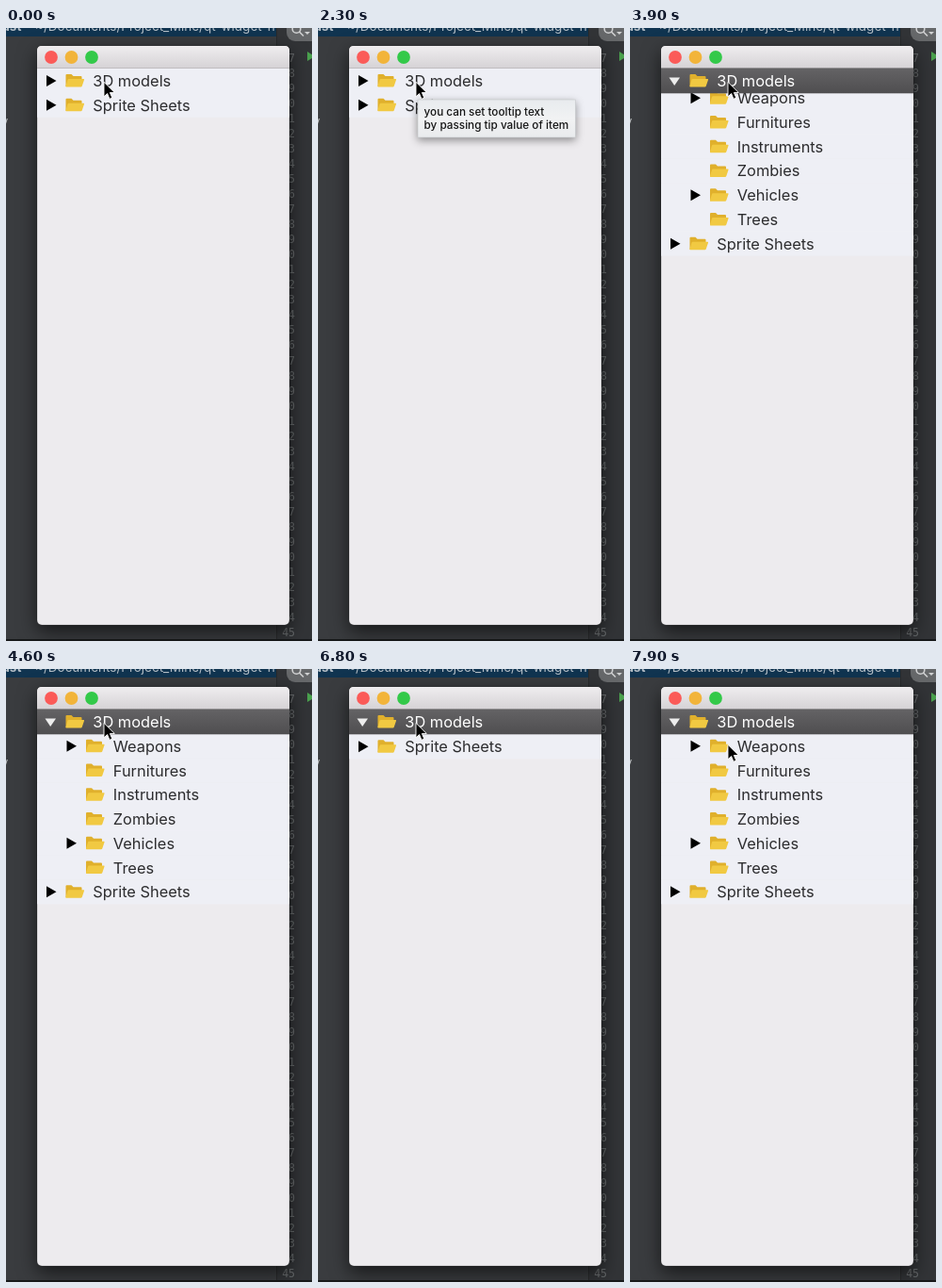
An HTML page that plays this animation: 325x650 px, repeating every 8 s.

```html
<!DOCTYPE html>
<html lang="en">
<head>
<meta charset="utf-8">
<title>Tree widget</title>
<style>
html, body { margin: 0; width: 100%; height: 100%; overflow: hidden; background: #36383a; }
svg { display: block; width: 325px; height: 650px; }
text { white-space: pre; }
.row { font: 16.4px Inter, "Open Sans", sans-serif; fill: #2c2c2e; }
.tip { font: 500 11.75px Inter, "Open Sans", sans-serif; fill: #161616; }
.line { font: 11.5px "DejaVu Sans Mono", monospace; fill: #66696b; text-anchor: end; }
.path { font: 13.5px Inter, "Open Sans", sans-serif; fill: #b4bec6; }
#win { filter: drop-shadow(0 7px 10px #0009); }
#tip { filter: drop-shadow(0 3px 4px #0006); }
</style>
</head>
<body>
<svg viewBox="0 0 325 650">
  <defs>
    <linearGradient id="bar" x2="0" y2="1"><stop stop-color="#efedef"/><stop offset="1" stop-color="#d5d2d5"/></linearGradient>
    <linearGradient id="sel" x2="0" y2="1"><stop stop-color="#646365"/><stop offset="1" stop-color="#4f4e50"/></linearGradient>
    <linearGradient id="pane" x2="0" y2="1"><stop stop-color="#e8ebee"/><stop offset=".5" stop-color="#f1f2f3"/><stop offset="1" stop-color="#e9ebed"/></linearGradient>
    <clipPath id="below"><rect x="33" y="69" width="268" height="560"/></clipPath>
    <g id="folder">
      <path d="M.5 6V-6Q.5-7 1.500-7H6.500L8.500-5H16.500Q17.500-5 17.500-4V4Z" fill="#e0b02c"/>
      <path d="M3.500-2H19.500Q20.300-2 20-1L17.800 5.500Q17.500 6.500 16.500 6.500H1Q.3 6.500.5 5.500L2.500-1.200Q2.800-2 3.500-2Z" fill="#f1c942"/>
    </g>
    <path id="shut" d="M-5-6 5.500 0-5 6Z"/>
  </defs>

  <rect width="325" height="650" fill="#3a3c3f"/>
  <rect x="287" width="38" height="650" fill="#323437"/>
  <path d="M287.500 0V650" stroke="#292b2c"/>
  <rect width="287" height="9" fill="#103450"/>
  <text class="path" y="3"><tspan x="-4" font-weight="700">ast</tspan><tspan x="31">~/Documents/Project_Mine/qt-widget-n</tspan></text>
  <rect x="298" y="-12" width="40" height="26" rx="9" fill="#66686a"/>
  <g fill="none" stroke="#d0d1d2" stroke-width="1.600"><circle cx="308.500" cy="1" r="4.300"/><path d="M311.500 4 316 8.500"/></g>
  <path d="M317 4H323L320 7Z" fill="#d0d1d2"/>
  <text x="-4.500" y="103" font-family="Inter, sans-serif" font-size="12" fill="#b8bbbd">y</text>
  <g id="lines"></g>
  <path d="M320 25 328 30 320 35Z" fill="#4aa14e"/>
  <path d="M0 649H325" stroke="#17191a" stroke-width="2"/>

  <g id="win">
    <rect x="33" y="19" width="268" height="614" rx="5" fill="#edebee" stroke="#0005" stroke-width=".6"/>
    <path d="M33 43V24Q33 19 38 19H296Q301 19 301 24V43Z" fill="url(#bar)"/>
    <path d="M33 42.500H301" stroke="#c0bdc0"/>
    <circle cx="48" cy="31" r="6.900" fill="#fb5b58"/>
    <circle cx="69.500" cy="31" r="6.900" fill="#f2b43a"/>
    <circle cx="91" cy="31" r="6.900" fill="#33c949"/>
  </g>
  <g clip-path="url(#below)"><g id="kids"></g></g>
  <g id="last"></g>
  <rect x="33" y="43" width="268" height="26" fill="#eeeff5"/>
  <rect id="pick" x="33" y="42.500" width="268" height="26.800" fill="url(#sel)"/>
  <g id="first"></g>
  <path id="open" d="M41.500 52.500H53L47.200 61Z" fill="#ededed"/>

  <g id="tip">
    <rect x="106" y="76" width="167.500" height="40" fill="url(#pane)" stroke="#c3c6c8" stroke-width=".6"/>
    <text class="tip" x="112.500" y="93">you can set tooltip text</text>
    <text class="tip" x="112.500" y="107">by passing tip value of item</text>
  </g>
  <path id="cursor" d="M0 0V15.500L3.600 12.200 6 18 8.800 16.800 6.400 11.200H11.300Z" fill="#000" stroke="#fff" stroke-width=".9"/>
</svg>
<script>
const $ = id => document.getElementById(id);
const LOOP = 8000, STEP = 25.75, SLIDE = 250, TOP = 56;
const names = ["Weapons", "Furnitures", "Instruments", "Zombies", "Vehicles", "Trees"];
const height = names.length * STEP;
// Start time and resulting state of each toggle
const toggles = [[3690, 1], [4950, 0], [5690, 1], [6150, 0], [6790, 1]];

function row(label, index, indent, arrow, tint = "#eeeff5") {
  const y = TOP + index * STEP, x = 63 + indent;
  return `<rect x="33" y="${y - 13}" width="268" height="26" fill="${tint}"/>` +
    (arrow ? `<use class="shut" href="#shut" x="${x - 15}" y="${y}"/>` : "") +
    `<use href="#folder" x="${x}" y="${y}"/>` +
    `<text class="row" x="${x + 29.3}" y="${y + 6}">${label}</text>`;
}

$("first").innerHTML = row("3D models", 0, 0, true, "none");
$("last").innerHTML = row("Sprite Sheets", 1, 0, true);
$("kids").innerHTML = names.map((name, i) => row(name, i + 1, 21.5, i % 4 == 0)).join("");
$("lines").innerHTML = Array.from({ length: 39 }, (_, i) =>
  `<text class="line" x="307" y="${35.5 + i * 16.05}">${i + 7}</text>`).join("");

const arrow = $("first").querySelector(".shut");
const label = $("first").querySelector("text");
const clamp = v => Math.max(0, Math.min(1, v));
const ease = v => v < .5 ? 2 * v * v : 1 - 2 * (1 - v) ** 2;
const show = (node, on) => node.style.display = on ? "" : "none";
const shift = (id, x, y) => $(id).setAttribute("transform", `translate(${x} ${y})`);

function draw(t) {
  let spread = 0, open = 0;
  for (const [start, state] of toggles) {
    if (t < start) break;
    const p = ease(clamp((t - start) / SLIDE));
    spread = state ? p : 1 - p;
    open = state;
  }
  const picked = t >= 3600;
  shift("kids", 0, (spread - 1) * height);
  shift("last", 0, spread * height);
  show($("kids"), spread > 0);
  show($("pick"), picked);
  show($("open"), open);
  show(arrow, !open);
  arrow.style.fill = picked ? "#ededed" : "#000";
  label.style.fill = picked ? "#fff" : "";
  show($("tip"), t >= 600 && t < 3600);
  shift("cursor", 104, 57.3 + 23 * ease(clamp((t - 7350) / 500)));
}

const begin = performance.now();
function tick() {
  draw((performance.now() - begin) % LOOP);
  requestAnimationFrame(tick);
}
tick();
</script>
</body>
</html>
```
